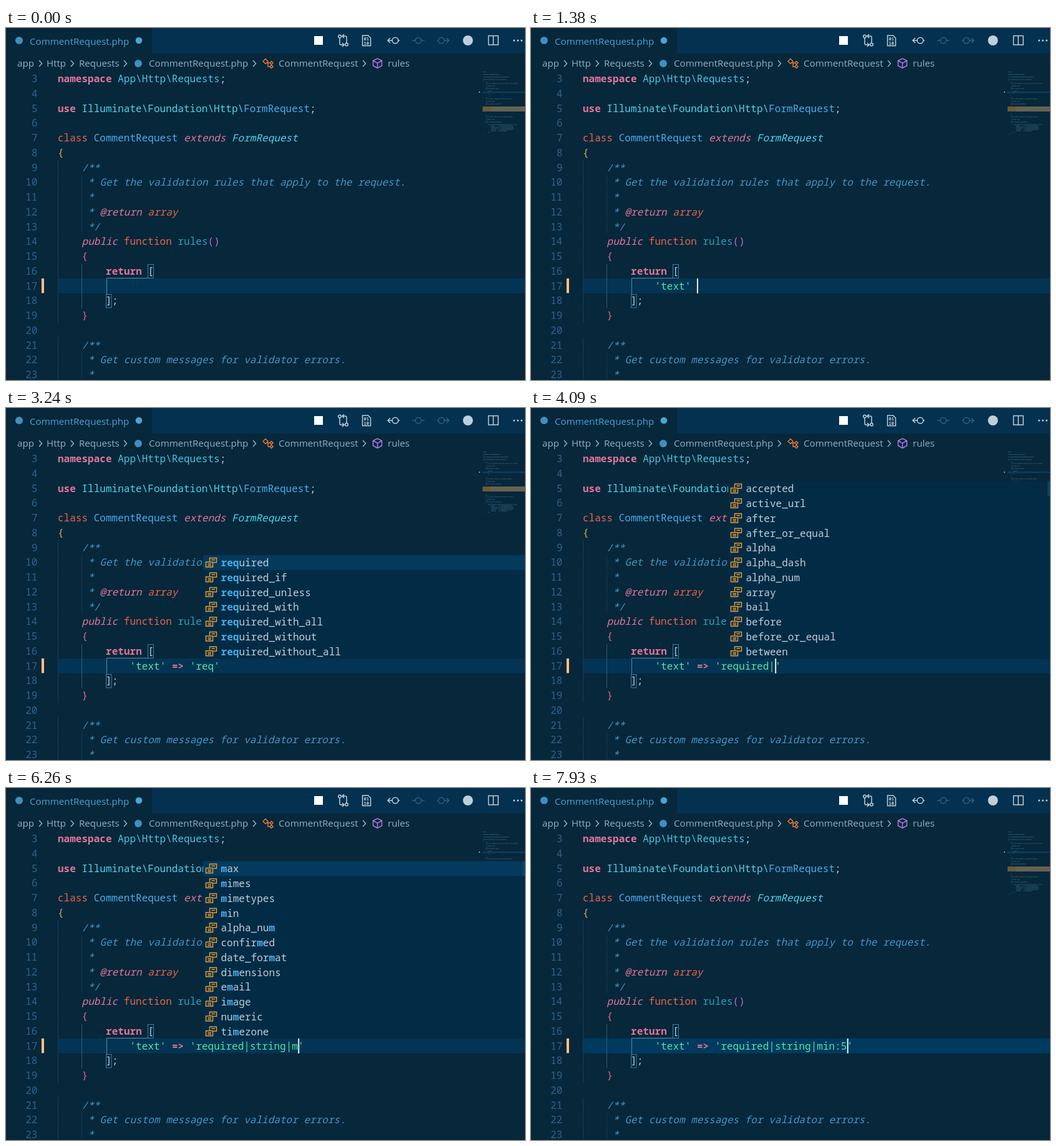
Write an HTML page that moves like this. It is 832 px wide and 565 px high and loops after 8 s.

```html
<!DOCTYPE html>
<html lang="en">
<head>
<meta charset="utf-8">
<title>Editor</title>
<style>
  html, body { margin: 0; width: 100%; height: 100%; overflow: hidden; background: #07273b; }
  svg { display: block; }
  text { white-space: pre; font: 16.05px "Noto Sans Mono", monospace; fill: #becfda; }
  .ui { font: 15.15px "Open Sans", "Noto Sans", sans-serif; fill: #92b0c4; }
  .num { fill: #2c658f; text-anchor: end; }
  .key { fill: #df769b; font-weight: bold; }
  .mod { fill: #df769b; font-style: italic; }
  .type { fill: #e66548; }
  .doc { fill: #e66548; font-style: italic; }
  .ns { fill: #49c3dc; }
  .cls { fill: #49ace9; }
  .base { fill: #49d6e9; font-style: italic; }
  .fn { fill: #2aa3b6; }
  .com { fill: #4695c4; font-style: italic; }
  .str { fill: #49e9a6; }
  .gold { fill: #d9ac55; }
  .pink { fill: #e3628d; }
  .mag { fill: #c565d8; }
  .hit { fill: #49ace9; font-weight: bold; }
  .line { fill: none; stroke: #becfda; stroke-width: 1.5; }
</style>
</head>
<body>
<svg id="stage" width="832" height="565" viewBox="0 0 832 565"></svg>
<script>
const LOOP = 8000, CW = 9.63, LH = 23.75;
const colX = c => 83 + c * CW;
const baseY = n => 87 + (n - 3) * LH;
const topY = n => 69.2 + (n - 3) * LH;

const rect = (x, y, w, h, fill, more = '') =>
  `<rect x="${x}" y="${y}" width="${w}" height="${h}" fill="${fill}" ${more}/>`;
const path = (d, more = '') => `<path class="line" d="${d}" ${more}/>`;
const text = (x, y, cls, s) => `<text x="${x}" y="${y}" class="${cls}">${s}</text>`;
const span = (cls, s) => `<tspan class="${cls}">${s.replace(/>/g, '&gt;')}</tspan>`;
const dot = (x, y, r, fill) => `<circle cx="${x}" cy="${y}" r="${r}" fill="${fill}"/>`;

// line number: column, then class and text in turn
const code = {
  3: [0, 'key', 'namespace', 'ns', ' App\\Http\\Requests', '', ';'],
  5: [0, 'key', 'use', 'base" font-style="normal" style="font-style:normal', ' Illuminate\\Foundation\\Http\\', 'cls', 'FormRequest', '', ';'],
  7: [0, 'type', 'class', 'cls', ' CommentRequest', 'mod', ' extends', 'base', ' FormRequest'],
  8: [0, 'gold', '{'],
  9: [4, 'com', '/**'],
  10: [5, 'com', '* Get the validation rules that apply to the request.'],
  11: [5, 'com', '*'],
  12: [5, 'com', '* ', 'mod', '@return', 'doc', ' array'],
  13: [5, 'com', '*/'],
  14: [4, 'mod', 'public', 'type', ' function', 'fn', ' rules', 'mag', '()'],
  15: [4, 'pink', '{'],
  16: [8, 'key', 'return', '', ' ['],
  18: [8, '', '];'],
  19: [4, 'pink', '}'],
  21: [4, 'com', '/**'],
  22: [5, 'com', '* Get custom messages for validator errors.'],
  23: [5, 'com', '*']
};

const tokens = parts => {
  let out = '';
  for (let i = 0; i < parts.length; i += 2) out += span(parts[i], parts[i + 1]);
  return out;
};
const plain = parts => parts.filter((_, i) => i % 2).join('');

function miniLine(n, col, s) {
  let out = '';
  for (const m of s.matchAll(/\S+/g))
    out += rect(765 + (col + m.index) * .95, 70 + (n - 1) * 2.06, m[0].length * .95, 1, '#5a94ad', 'opacity=".42"');
  return out;
}

function minimap() {
  const extra = [
    [1, 0, '<?php'], [24, 5, '* @return array'], [25, 5, '*/'],
    [26, 4, 'public function messages()'], [27, 4, '{'], [33, 4, '}'],
    [35, 4, '/**'], [36, 5, '* Get custom attributes for validator errors.'], [37, 5, '*'],
    [38, 5, '* @return array'], [39, 5, '*/'], [40, 4, 'public function attributes()'], [41, 4, '{'],
    [42, 8, 'return array_merge(parent::attributes(), [ trans('],
    [43, 13, "'text'       => trans('labels.text'),"],
    [44, 13, "'commentable' => trans('labels.item'),"],
    [45, 13, "'parent_id'  => trans('labels.parent'),"],
    [46, 13, "'user_id'    => trans('labels.user'),"],
    [47, 13, "'status'     => trans('x'),"],
    [48, 8, ']);'], [49, 4, '}'], [50, 0, '}']
  ];
  let out = rect(764, 102, 68, 2.4, '#0b3f5e') + rect(758, 102, 2, 2, '#3fae86');
  for (const n in code) out += miniLine(+n, code[n][0], plain(code[n].slice(1)));
  for (const e of extra) out += miniLine(...e);
  out += rect(764, 126, 68, 8, '#6a5a38') + rect(777, 126, 55, 8, '#656250');
  return out;
}

function toolbar() {
  const dim = 'opacity=".28"';
  return rect(494, 13, 14, 14, '#fff') +
    path('M535 16v9q0 2 2 2h5m-3-3 3 3-3 3M546 24v-9q0-2-2-2h-5m3-3-3 3 3 3') +
    `<g class="line"><circle cx="535" cy="13.5" r="2.3"/><circle cx="546" cy="26.5" r="2.3"/></g>` +
    path('M571.5 12h9l4 4v12.500h-13z') +
    '<text x="573.5" y="20" style="font-size:7px;font-weight:bold">01</text>' +
    '<text x="573.5" y="27" style="font-size:7px;font-weight:bold">10</text>' +
    '<g class="line"><circle cx="624" cy="20" r="4.800"/><path d="M619 20h-7m4-4-4 4 4 4M629 20h2"/></g>' +
    `<g class="line" ${dim}><circle cx="661" cy="20" r="4.800"/><path d="M651 20h5M666 20h5"/></g>` +
    `<g class="line" ${dim}><circle cx="698" cy="20" r="4.800"/><path d="M691 20h2M703 20h7m-4-4 4 4-4 4"/></g>` +
    dot(740.5, 20, 8, '#becfda') +
    path('M773.5 12.500h15.500v14.500h-15.500zM781.200 12.500v14.500') +
    [814.5, 820.5, 826.5].map(x => dot(x, 20, 1.5, '#becfda')).join('');
}

function header() {
  const crumbs = [[18, 'app'], [65, 'Http'], [117, 'Requests'], [229, 'CommentRequest.php'], [437, 'CommentRequest'], [612, 'rules']];
  return rect(234, 0, 598, 41, '#03314f') +
    dot(21, 20, 6, '#3f8fc2') + text(38, 27, 'ui" style="fill:#49a3d2', 'CommentRequest.php') +
    dot(213, 20, 5.3, '#49a6d8') + toolbar() +
    crumbs.map(([x, s]) => text(x, 62, 'ui', s)).join('') +
    [53, 104, 189, 396, 572].map(x => path(`M${x} 52l4.500 5-4.500 5`, 'style="stroke:#92b0c4"')).join('') +
    dot(212, 57, 6, '#3f8fc2') +
    path('M412 53.500l4-4 4 4-4 4zM418 56h5M420 56v6h3M423 56l2.500-2.500 2.500 2.500-2.500 2.500zM423 62l2.500-2.500 2.500 2.500-2.500 2.500z', 'style="stroke:#e07a3c"') +
    path('M588.500 52.500l7-3.500 7 3.500v8l-7 4-7-4zM588.500 52.500l7 4 7-4M595.500 56.500v8', 'style="stroke:#b07ae0"');
}

function editor() {
  let out = '';
  for (let n = 9; n <= 23; n++) {
    if (n !== 20) out += rect(83, topY(n), 1, LH, '#163f57');
    if (n > 9 && n < 14 || n > 21) out += rect(121, topY(n), 1, LH, '#12384f');
  }
  out += rect(121, 379, 1, 71, '#2a5d77');
  for (let n = 3; n <= 23; n++) {
    out += text(50.5, baseY(n), 'num', n);
    if (code[n]) out += text(colX(code[n][0]), baseY(n), '', tokens(code[n].slice(1)));
  }
  const box = 'stroke="#3383a8"';
  return out + rect(227.5, 379.5, 9, 22, 'none', box) + rect(160.5, 427.5, 8.5, 21.5, 'none', box) +
    rect(57, 402, 4, 23.5, '#ffc180');
}

const ALL = 'accepted active_url after after_or_equal alpha alpha_dash alpha_num array bail before before_or_equal between';
const REQ = 'required required_if required_unless required_with required_with_all required_without required_without_all';

const menu = (list, typed = '', x = 316.5) => ({ list: list.split(' '), typed, x });

function label(word, typed) {
  let k = 0;
  return [...word].map(c => c === typed[k] ? (k++, span('hit', c)) : c).join('');
}

function popup({ list, typed, x }) {
  const h = list.length * LH, y0 = list.length > 5 ? 402.5 - h : 426.500;
  let out = rect(x - .5, y0, 833 - x, h, '#022b45');
  if (typed) out += rect(x - .5, y0, 833 - x, LH, '#043a5c');
  if (list.length > 11) out += rect(828, y0, 4, 24, '#0a4368');
  list.forEach((w, i) => {
    const y = y0 + 12 + i * LH, ix = x + 4;
    out += path(`M${ix + 6} ${y - 2}v-5.500h11v7h-5M${ix + 9} ${y - 4.500}h5.500M${ix} ${y - 1}h11v8h-11zM${ix + 3} ${y + 2}h5.500M${ix + 3} ${y + 4.500}h5.500`,
      'style="stroke:#e39a35"') + text(x + 28, y + 5.800, '', label(w, typed));
  });
  return out;
}

// time, text of line 17, cursor column (0 hides it), menu, row colour
const ROW = '#043453', BRIGHT = '#003a5f';
const R = "'text' => '", S = R + 'required', T = S + '|string', V = T + "|min:value'";
const steps = [
  [0, '', 0], [70, '', 12], [300, "''", 13], [530, "'t'", 14], [690, "'te'", 15],
  [840, "'tex'", 16], [1070, "'text'", 17], [1300, "'text'", 18], [1380, "'text' ", 19],
  [1690, "'text' =", 20], [2010, "'text' =>", 21], [2090, "'text' => ", 22],
  [2320, R + "'", 23], [2470, R + "'", 23, menu(ALL, '', 305.5)],
  [2540, R + "r'", 24, menu('regex ' + REQ + ' array before after accepted', 'r')],
  [2780, R + "re'", 25, menu('regex ' + REQ + ' present', 're')],
  [3240, R + "req'", 0, menu(REQ, 'req')],
  [3460, S + "'", 31], [3940, S + "|'", 32], [4090, S + "|'", 32, menu(ALL)],
  [4410, S + "|s'", 33, menu('same size sometimes starts_with string alpha_dash distinct dimensions exists present timezone unique', 's')],
  [4600, S + "|st'", 34, menu('starts_with string distinct exists present', 'st')],
  [4790, S + "|str'", 35, menu('string starts_with', 'str')],
  [5250, T + "'", 38], [5730, T + "|'", 39], [5800, T + "|'", 39, menu(ALL)],
  [6260, T + "|m'", 40, menu('max mimes mimetypes min alpha_num confirmed date_format dimensions email image numeric timezone', 'm')],
  [6580, T + "|mi'", 41, menu('mimes mimetypes min dimensions numeric', 'mi')],
  [6660, T + "|min'", 42, menu('min', 'min')],
  [7060, V, 48], [7150, V, 48, null, 'none'], [7530, V, 0, null, 'none'],
  [7850, T + "|min:5'", 44], [7930, T + "|min:5'", 44, null, BRIGHT]
];

function row([, s, , , fill = ROW]) {
  return rect(83, 402, 749, 24, fill) +
    (s === V ? rect(colX(43), 402, 5 * CW, 24, '#125580') : '') +
    path('M161.500 427v-25.500h75', 'style="stroke:#4a8fb2;stroke-width:1"') +
    text(colX(12), baseY(17), '', s.split(/(=>?)/).map(p => span(p[0] === '=' ? 'key' : 'str', p)).join('')) +
    miniLine(17, 12, s);
}

const stage = document.getElementById('stage');
stage.innerHTML = '<g id="row"></g><g>' + header() + editor() + minimap() + '</g><g id="over"></g>';
const rowLayer = document.getElementById('row'), overLayer = document.getElementById('over');

let shown;
function draw() {
  const t = (performance.now() - start) % LOOP;
  const step = steps.findLast(s => s[0] <= t);
  if (step !== shown) {
    shown = step;
    rowLayer.innerHTML = row(step);
    overLayer.innerHTML = (step[3] ? popup(step[3]) : '') +
      (step[2] ? rect(colX(step[2]), 402, 2, 24, '#e8f2f8') : '');
  }
  requestAnimationFrame(draw);
}
const start = performance.now();
draw();
</script>
</body>
</html>
```
